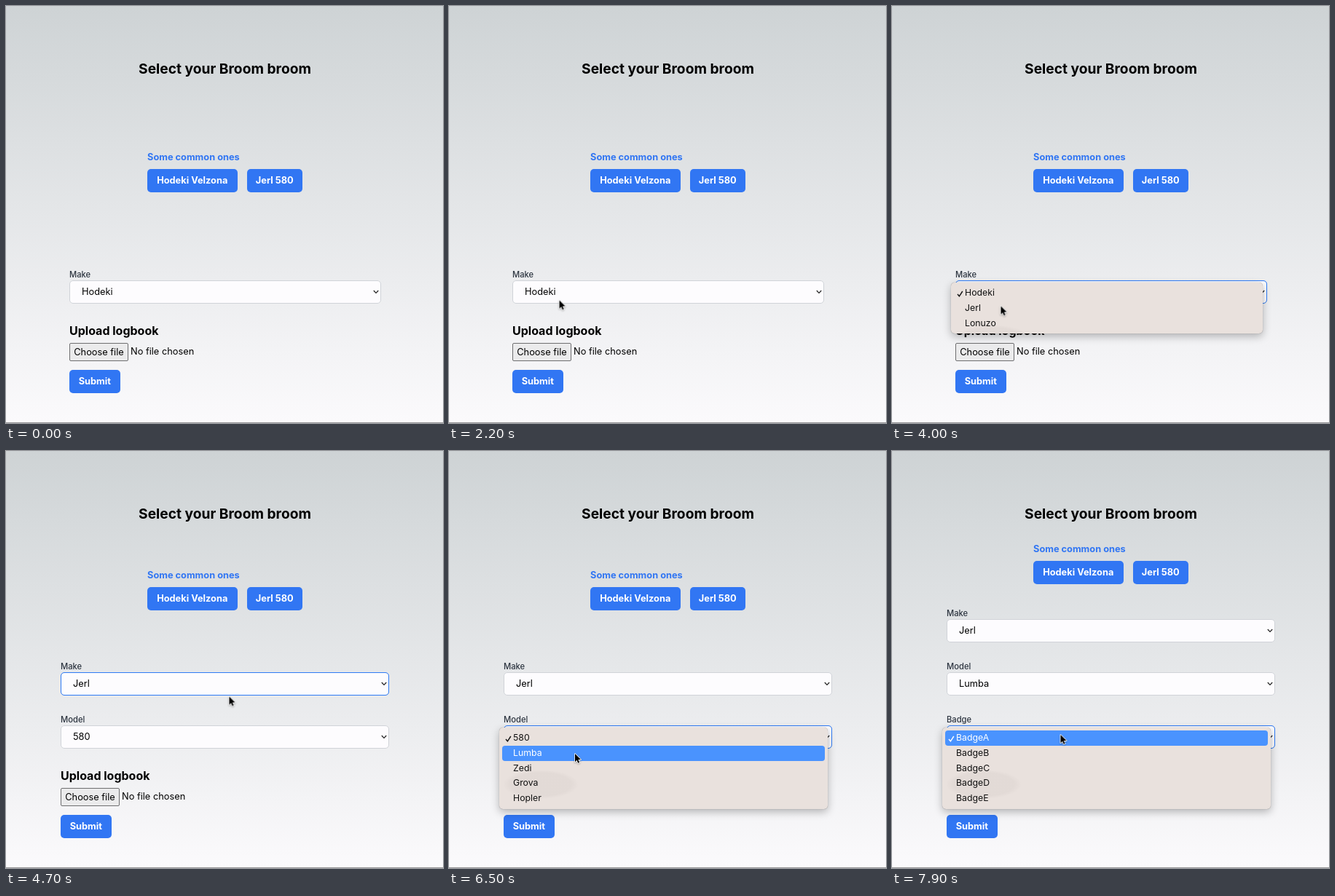
These frames come from a looping animation (600x573 px, 8000 ms). An HTML page:

```html
<!DOCTYPE html>
<html lang="en">
<head>
<meta charset="utf-8">
<title>Select your Broom broom</title>
<style>
:root { --blue: #3176f3; --hl: #4a93fe; --ink: #111; }
* { box-sizing: border-box; }
html, body { margin: 0; width: 100%; height: 100%; overflow: hidden; }
body { font: 12.8px/20px Inter, sans-serif; color: #000; }
.stage {
  position: relative; width: 600px; height: 573px; overflow: hidden;
  background: linear-gradient(#ced3d5, #fbfafc);
}
.stage::after {
  content: ""; position: absolute; left: 0; bottom: 0; width: 100%; height: 1px; background: #98989a;
}
.stage div, .stage svg { position: absolute; white-space: nowrap; }

/* state changes are hard cuts */
.step { animation: 8s steps(1, end) infinite; }
.layer { inset: 0; }

.title { left: 0; width: 601px; top: 72px; line-height: 29px; font-size: 19.2px; font-weight: 700; text-align: center; }
.btn { height: 32px; border-radius: 5px; background: var(--blue); color: #fff; font-weight: 700; line-height: 32px; text-align: center; }
.hint { left: 194px; top: 198px; color: var(--blue); font-weight: 700; }
.upload { left: 87px; top: 436px; font-size: 16px; font-weight: 700; }
.choose { left: 87px; top: 463px; width: 81px; height: 25px; border: 1px solid #6e6e70; border-radius: 2px; background: #ebebec; line-height: 23px; text-align: center; }
.nofile { left: 171px; top: 465px; }

.field { left: var(--x); width: var(--w); top: var(--y); height: 32px; }
.field i { position: absolute; left: 0; top: -18px; font: 500 11.2px/20px Inter, sans-serif; color: #2d3540; }
.field b {
  display: block; height: 32px; padding-left: 16px; border: 1px solid #d0d3d8; border-radius: 5px;
  background: #fdfcfe; font-weight: 400; line-height: 30px;
}
.field svg { right: 3px; top: 13px; width: 8px; height: 6px; fill: none; stroke: #222; stroke-width: 1.2; }
.one { --x: 87px; --w: 428px; }
.many { --x: 75px; --w: 451px; }
.y1 { --y: 231px; }
.y2 { --y: 304px; }
.y3 { --y: 377px; }

.ring { height: 32px; border: 1px solid #2f7bf5; border-radius: 5px; }

.menu {
  top: 380px; padding: 4px; border-radius: 5px;
  background: radial-gradient(52px 20px at 57px 78px, rgba(60, 50, 50, .04) 80%, transparent) #e9e1dd;
  box-shadow: 0 0 1px rgba(0, 0, 0, .45), 0 4px 12px rgba(0, 0, 0, .27);
  font-size: 12.3px; color: var(--ink);
}
.stage .menu p { position: relative; margin: 0; height: 20.8px; padding-left: 15px; border-radius: 4px; line-height: 20.8px; }
.menu svg { left: 3.5px; top: 6.5px; width: 9px; height: 9px; fill: none; stroke: currentColor; stroke-width: 1.4; }

.cursor { left: -2px; top: -2px; width: 14px; height: 19px; overflow: visible; filter: drop-shadow(0 1px 1px rgba(0, 0, 0, .3)); }
.pointer { left: 0; top: 0; animation: move 8s linear infinite; }

.picks { animation-name: picks; }
.lower { animation-name: lower; }
.first { animation-name: first; }
.second { animation-name: second; }
.third { animation-name: third; }
.ring { animation-name: ring; }
.makes { left: 81px; width: 428px; animation-name: makes; }
.models { left: 69px; width: 451px; animation-name: models; }
.badges { left: 69px; width: 451px; animation-name: badges; }
.show { animation-name: show; }
.make1 { animation-name: make1; }
.make2 { animation-name: make2; }
.model1 { animation-name: model1; }
.model2 { animation-name: model2; }
.badge1 { animation-name: badge1; }

@keyframes picks { 0% { top: 0; } 52.45% { top: -36.7px; } 85%, 100% { top: -73.2px; } }
@keyframes lower { 0% { left: 0; } 52.45%, 100% { left: -12px; } }
@keyframes first { 0% { opacity: 1; } 52.45%, 100% { opacity: 0; } }
@keyframes second { 0% { opacity: 0; } 52.45% { opacity: 1; } 85%, 100% { opacity: 0; } }
@keyframes third { 0% { opacity: 0; } 85%, 100% { opacity: 1; } }
@keyframes ring {
  0% { opacity: 0; left: 87px; top: 377px; width: 428px; }
  32.45% { opacity: 1; left: 87px; top: 377px; width: 428px; }
  52.45% { opacity: 1; left: 75px; top: 304px; width: 451px; }
  67.4% { opacity: 1; left: 75px; top: 377px; width: 451px; }
  85% { opacity: 1; left: 75px; top: 304px; width: 451px; }
  94.95%, 100% { opacity: 1; left: 75px; top: 377px; width: 451px; }
}
@keyframes makes { 0% { opacity: 0; } 32.45% { opacity: 1; } 52.45%, 100% { opacity: 0; } }
@keyframes models { 0% { opacity: 0; } 67.4% { opacity: 1; } 85%, 100% { opacity: 0; } }
@keyframes badges { 0% { opacity: 0; } 94.95%, 100% { opacity: 1; } }
@keyframes show { 0% { opacity: 0; } 7.45%, 100% { opacity: 1; } }

/* the chosen row blinks once before its menu closes */
@keyframes make1 {
  0% { background: var(--hl); color: #fff; }
  43.75%, 100% { background: transparent; color: var(--ink); }
}
@keyframes make2 {
  0%, 49.9% { background: transparent; color: var(--ink); }
  43.75%, 51.2%, 100% { background: var(--hl); color: #fff; }
}
@keyframes model1 {
  0% { background: var(--hl); color: #fff; }
  73.75%, 100% { background: transparent; color: var(--ink); }
}
@keyframes model2 {
  0%, 82.5% { background: transparent; color: var(--ink); }
  73.75%, 83.75%, 100% { background: var(--hl); color: #fff; }
}
@keyframes badge1 { 0%, 100% { background: var(--hl); color: #fff; } }

@keyframes move {
  0%, 7.5% { transform: translate(75px, 462px); }
  17.5% { transform: translate(120px, 428px); }
  27.5% { transform: translate(151.5px, 404.5px); }
  32.5% { transform: translate(152px, 399px); }
  42.5% { transform: translate(151px, 403px); }
  46.25%, 52.5% { transform: translate(149.5px, 412.5px); }
  57.5%, 59.5% { transform: translate(306.5px, 337.5px); }
  62.5% { transform: translate(300px, 360px); }
  65%, 67.5% { transform: translate(209px, 395px); }
  71.25% { transform: translate(205px, 398px); }
  75% { transform: translate(184px, 408px); }
  78.75%, 84% { transform: translate(173px, 416px); }
  88.75% { transform: translate(244px, 372px); }
  92.5%, 100% { transform: translate(231.5px, 390px); }
}
</style>
</head>
<body>
<svg width="0" height="0" style="position:absolute">
  <symbol id="chevron" viewBox="0 0 8 6"><path d="M.8 1 4 4.4 7.2 1"/></symbol>
  <symbol id="check" viewBox="0 0 9 9"><path d="M1 5 3.4 7.8 7.8 1"/></symbol>
</svg>
<div class="stage">
  <div class="title">Select your Broom broom</div>

  <div class="layer step picks">
    <div class="hint">Some common ones</div>
    <div class="btn" style="left:194px;top:224px;width:123.5px">Hodeki Velzona</div>
    <div class="btn" style="left:330.5px;top:224px;width:76.5px">Jerl 580</div>
  </div>

  <div class="layer step first one">
    <div class="field y3"><i>Make</i><b>Hodeki</b><svg><use href="#chevron"/></svg></div>
  </div>
  <div class="layer step second many">
    <div class="field y2"><i>Make</i><b>Jerl</b><svg><use href="#chevron"/></svg></div>
    <div class="field y3"><i>Model</i><b>580</b><svg><use href="#chevron"/></svg></div>
  </div>
  <div class="layer step third many">
    <div class="field y1"><i>Make</i><b>Jerl</b><svg><use href="#chevron"/></svg></div>
    <div class="field y2"><i>Model</i><b>Lumba</b><svg><use href="#chevron"/></svg></div>
    <div class="field y3"><i>Badge</i><b>BadgeA</b><svg><use href="#chevron"/></svg></div>
  </div>

  <div class="layer step lower">
    <div class="upload">Upload logbook</div>
    <div class="choose">Choose file</div>
    <div class="nofile">No file chosen</div>
    <div class="btn" style="left:87px;top:500px;width:69.5px">Submit</div>
  </div>

  <div class="ring step"></div>

  <div class="menu step makes">
    <p class="step make1"><svg><use href="#check"/></svg>Hodeki</p>
    <p class="step make2">Jerl</p>
    <p>Lonuzo</p>
  </div>
  <div class="menu step models">
    <p class="step model1"><svg><use href="#check"/></svg>580</p>
    <p class="step model2">Lumba</p>
    <p>Zedi</p>
    <p>Grova</p>
    <p>Hopler</p>
  </div>
  <div class="menu step badges">
    <p class="step badge1"><svg><use href="#check"/></svg>BadgeA</p>
    <p>BadgeB</p>
    <p>BadgeC</p>
    <p>BadgeD</p>
    <p>BadgeE</p>
  </div>

  <div class="layer step show">
    <div class="pointer">
      <svg class="cursor" viewBox="-2 -2 14 19">
        <path d="M0 0V11.2L2.5 8.8 4.2 12.8 6.1 12 4.4 8.1H8Z" stroke="#fff" stroke-width="1.6" stroke-linejoin="round" paint-order="stroke"/>
      </svg>
    </div>
  </div>
</div>
</body>
</html>
```
